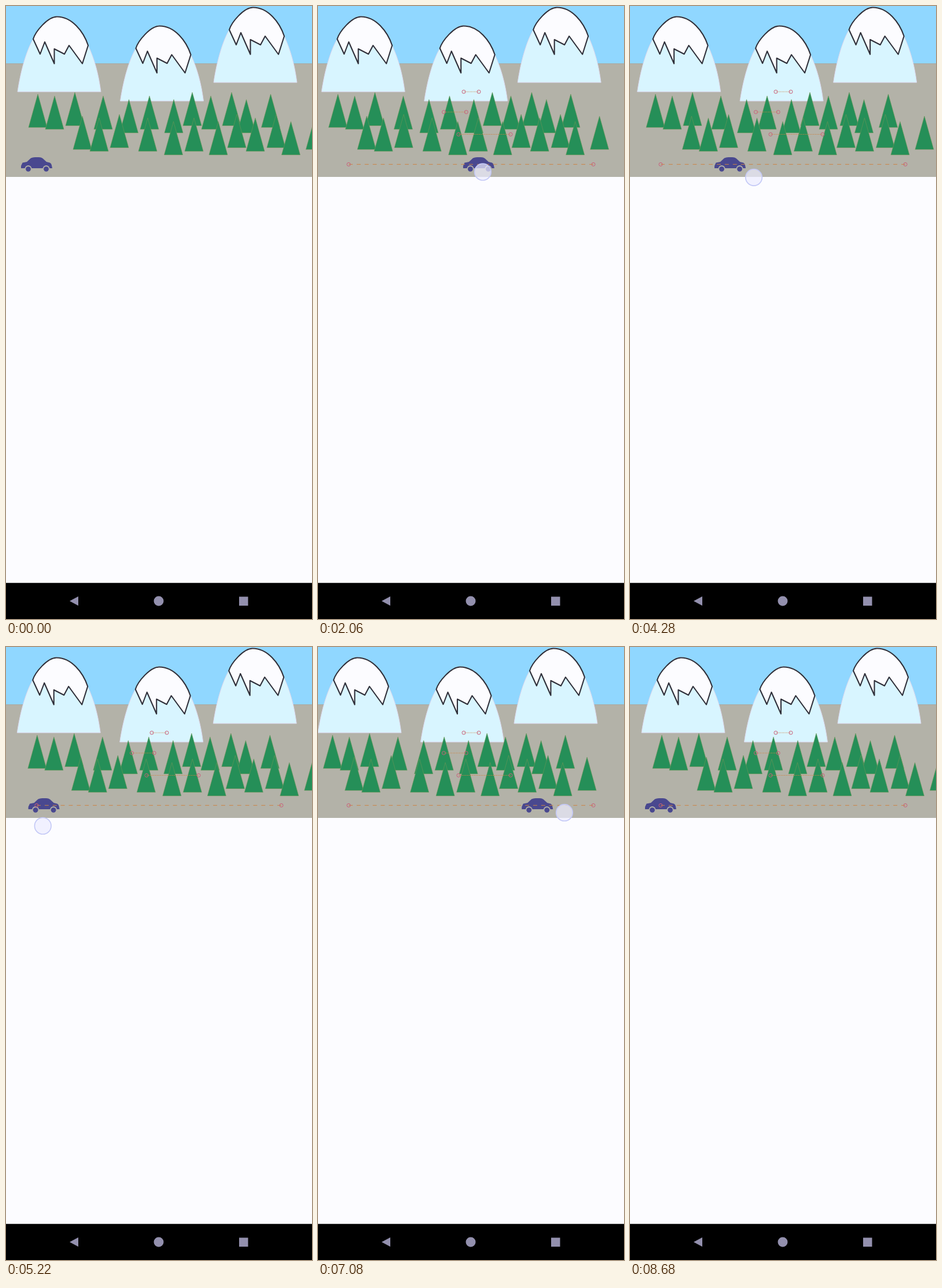
Write an HTML page that moves like this. It is 529x1058 px and loops after 9.21 s.

```html
<!DOCTYPE html>
<html lang="en">
<head>
<meta charset="utf-8">
<title>Parallax drive</title>
<style>
  html, body { margin: 0; width: 100%; height: 100%; overflow: hidden; background: #fcfcff; }
  svg { display: block; width: 529px; height: 1058px; }
</style>
</head>
<body>
<svg viewBox="0 0 529 1058" xmlns="http://www.w3.org/2000/svg">
  <defs>
    <g id="mountain">
      <path d="M20 148C26 108 36 76 47 57C58 38 72 18 88 18C112 18 132 40 142 68C153 92 160 117 164 148Z"
            fill="#d8f5ff" stroke="#dcd8ee"/>
      <path d="M47 57C51 44 72 18.500 88 18.500C114 18.500 134 44 142 68L132 99.500L109 68L101 83L83.500 74V99.500L67 62L59 83Z"
            fill="#fcfcff" stroke="#30303a" stroke-width="2.100" stroke-linejoin="round"/>
    </g>
    <path id="tree" d="M0 0L16 57.500H-16Z" fill="#258f58" stroke="#6f9658" stroke-width=".6"/>
    <g id="forest"></g>
  </defs>

  <rect width="529" height="100" fill="#90d7ff"/>
  <rect y="99" width="529" height="196" fill="#b3b2a8"/>
  <path d="M0 99.500H529" stroke="#a9a8a2"/>

  <g id="mountains">
    <use href="#mountain"/>
    <use href="#mountain" x="177.500" y="16"/>
    <use href="#mountain" x="339" y="-16"/>
  </g>
  <g id="backTrees"><use href="#forest"/></g>
  <g id="frontTrees"><use href="#forest" x="77" y="38"/></g>
  <g id="car" fill="#49488f">
    <path d="M26 280V276L28.500 270.500L36 269L43 262.500Q46 261 50 261H57Q61 261 63.500 263L70 269L76 270.500Q78.500 271.500 79 275L80 280Z"/>
    <g fill="#b3b2a8"><circle cx="38.500" cy="281" r="6"/><circle cx="69.500" cy="281" r="6"/></g>
    <circle cx="38.500" cy="281.300" r="4.400"/><circle cx="69.500" cy="281.300" r="4.400"/>
  </g>

  <g id="paths" fill="none"></g>
  <circle id="touch" r="14.300" fill="#ececff" fill-opacity=".7" stroke="#c3c8f6" stroke-width="1.600"/>

  <rect y="995.700" width="529" height="63" fill="#000"/>
  <g fill="#9390ae">
    <path d="M110 1027L125 1019V1035Z"/>
    <circle cx="264" cy="1027" r="8.500"/>
    <rect x="403" y="1019.500" width="15.500" height="15.500"/>
  </g>
</svg>
<script>
const LOOP = 9210;
const TRAVEL = 423;   // car distance in px
const DRAG = 0.987;   // car px per finger px
const $ = id => document.getElementById(id);

function add(parent, tag, attrs) {
  const el = document.createElementNS('http://www.w3.org/2000/svg', tag);
  for (const k in attrs) el.setAttribute(k, attrs[k]);
  parent.appendChild(el);
}

// Both rows share one forest: x and a step down the slope
const trees = [[55, 1], [84, 2], [119, 0], [168, 2], [212.5, 4], [248, 2],
  [290, 4], [322, 0], [354, 2], [390, 0], [415.5, 4], [457.5, 1]];
for (const [x, step] of trees) add($('forest'), 'use', { href: '#tree', x, y: 149 + 3.1 * step });

// Layers: distance moved, and where the path guide starts
const layers = [
  { id: 'mountains', move: -26, x: 252, y: 148 },
  { id: 'backTrees', move: -38.7, x: 217.5, y: 183 },
  { id: 'frontTrees', move: -90, x: 243, y: 221.5 },
  { id: 'car', move: TRAVEL, x: 53, y: 273.3 }
];

// Guides are 61 equal pieces, every second one drawn
for (const { move, x, y } of layers) {
  const length = Math.abs(move);
  add($('paths'), 'path', { d: `M${x} ${y}h${length}`, stroke: '#cc8444', 'stroke-dasharray': length / 61 });
  for (const cx of [x, x + length]) add($('paths'), 'circle', { cx, cy: y, r: 3, stroke: '#c9607a' });
}

// Finger strokes between resting points, eased by a power of time
const rests = [[57, 292], [521, 278], [51, 309], [524, 280], [51, 326]];
const strokes = [
  { from: 300, to: 2630, power: 2.54 },
  { from: 3210, to: 4850, power: 1 },
  { from: 5140, to: 6420, power: 1.31 },
  { from: 6870, to: 8640, power: 0.74 }
];
const first = strokes[0].from;
const release = strokes[strokes.length - 1].to;

const clamp = v => Math.min(1, Math.max(0, v));
const mix = (a, b, u) => a + (b - a) * u;

function pose(t) {
  const i = Math.max(0, strokes.filter(s => s.from <= t).length - 1);
  const { from, to, power } = strokes[i];
  const [x0, y0] = rests[i], [x1, y1] = rests[i + 1];
  const u = clamp((t - from) / (to - from)) ** power;
  const x = mix(x0, x1, u);
  // Strokes start alternately at the left and the right stop
  const progress = clamp(i % 2 + DRAG * (x - x0) / TRAVEL);
  return { x, y: mix(y0, y1, u ** 1.3), progress };
}

const show = (id, on) => $(id).setAttribute('visibility', on ? 'visible' : 'hidden');

function draw(t) {
  const { x, y, progress } = pose(t);
  for (const { id, move } of layers) {
    $(id).setAttribute('transform', `translate(${(move * progress).toFixed(2)} 0)`);
  }
  $('touch').setAttribute('cx', x.toFixed(2));
  $('touch').setAttribute('cy', y.toFixed(2));
  show('touch', t >= first && t < release);
  show('paths', t >= 40);
}

const start = performance.now();
function tick() {
  draw((performance.now() - start) % LOOP);
  requestAnimationFrame(tick);
}
draw(0);
requestAnimationFrame(tick);
</script>
</body>
</html>
```
